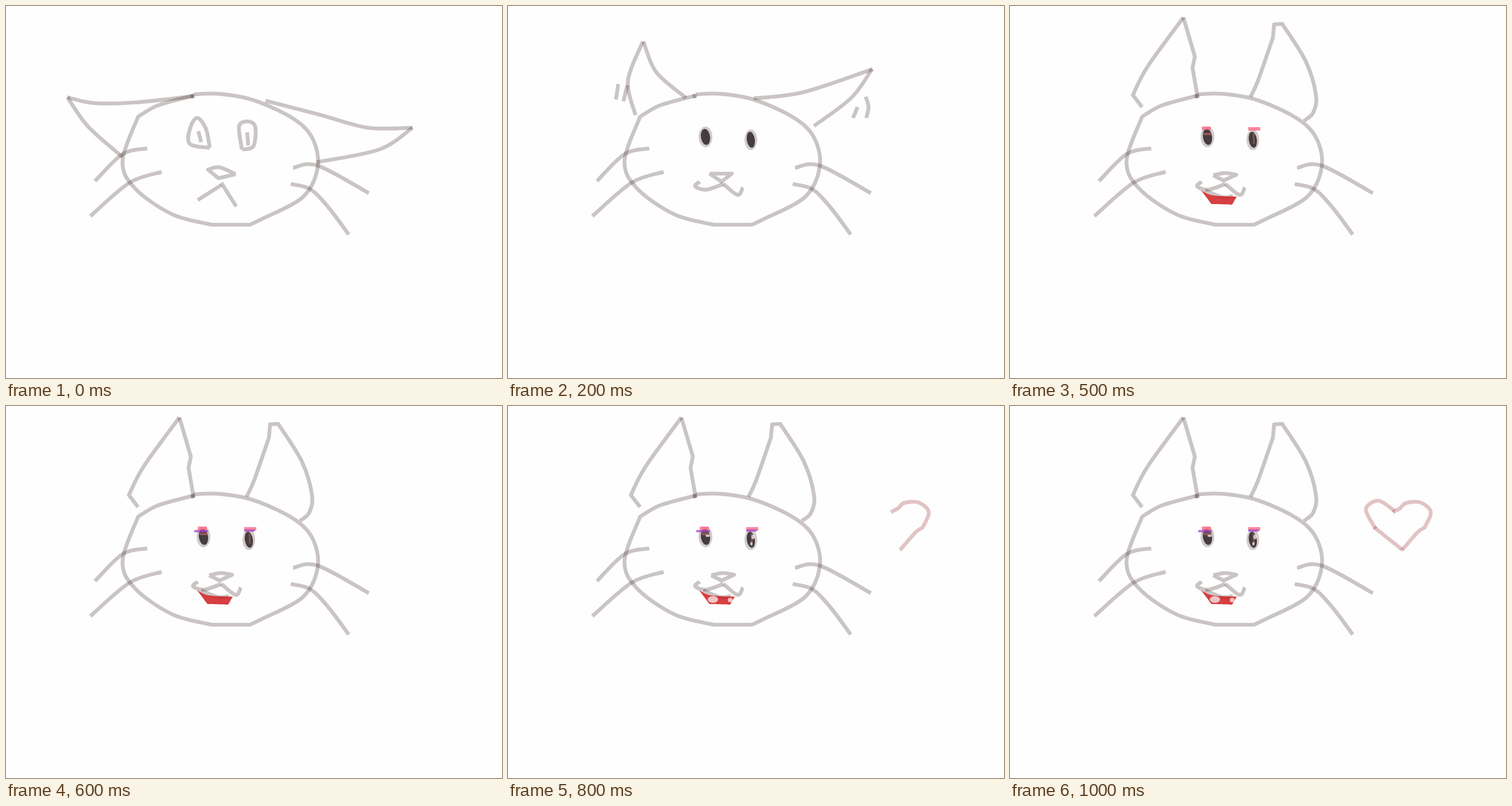
An HTML page with a canvas for the animation above (1.1 s loop, 864 by 648 pixels).

```html
<!DOCTYPE html>
<html lang="en">
<head>
<meta charset="utf-8">
<title>Cat sketch</title>
<style>
  html, body { margin: 0; width: 100%; height: 100%; overflow: hidden; background: #fdfefd; }
  canvas { display: block; filter: blur(.7px); }
</style>
</head>
<body>
<canvas id="stage" width="864" height="648"></canvas>
<script>
const STEP = 100, STEPS = 11;
const ctx = document.getElementById('stage').getContext('2d');
const INK = 'rgba(55,25,30,.25)', ROSE = 'rgba(150,30,40,.26)';
const parts = [];
let from, to;

// Everything added after show(a, b) is visible from step a up to, not including, step b.
function show(a, b = STEPS) { from = a; to = b; }

// Smooth curve through the points; "|" after a point makes it a corner.
function curve(text) {
  const path = new Path2D();
  let last = null;
  for (const span of text.split('|')) {
    const p = span.split(',').map(pair => pair.trim().split(' ').map(Number));
    if (last) p.unshift(last); else path.moveTo(...p[0]);
    for (let i = 0; i + 1 < p.length; i++) {
      const a = p[i - 1] || p[i], b = p[i], c = p[i + 1], d = p[i + 2] || c;
      path.bezierCurveTo(b[0] + (c[0] - a[0]) / 6, b[1] + (c[1] - a[1]) / 6,
        c[0] - (d[0] - b[0]) / 6, c[1] - (d[1] - b[1]) / 6, ...c);
    }
    last = p.at(-1);
  }
  return path;
}

function ink(text, color = INK, width = 6.6) {
  parts.push({ from, to, color, width, path: curve(text) });
}

function blob(color, x, y, rx, ry, tilt = 0) {
  const path = new Path2D();
  path.ellipse(x, y, rx, ry, tilt, 0, 2 * Math.PI);
  parts.push({ from, to, color, path });
}

function head() {
  show(0);
  ink('327 154, 370 153, 428 163, 497 194, 533 229, 543 280, 517 333, 446 371 | 425 381 | 358 381 | 290 363, 225 318, 203 270, 230 193 | 265 173, 327 156');
  blob(INK, 325, 157, 4, 4);
}

function whiskers() {
  show(0);
  ink('246 248, 203 258, 155 305');
  ink('271 289, 215 308, 147 366');
  ink('500 282, 543 278, 632 326');
  ink('496 310, 530 319, 561 350, 597 398');
}

function sadFace() {
  show(0, 1);
  ink('107 159, 152 169, 225 168, 327 157');
  ink('107 159, 143 210, 203 263');
  ink('452 165, 545 189, 630 212, 708 212');
  ink('708 212, 650 250, 541 272');
  ink('355 247 | 320 240, 321 212, 333 195, 348 213, 355 247');
  ink('335 218, 340 237');
  ink('411 250, 406 210, 420 201, 434 210, 431 244, 411 250');
  ink('420 220, 422 243');
  ink('400 293 | 372 281, 352 285 | 370 300 | 400 293');
  ink('334 338, 375 312');
  ink('375 308, 401 349');
}

function earsRising() {
  show(1, 2);
  ink('155 107, 195 136, 268 166, 292 165');
  ink('155 107, 168 165, 206 233');
  ink('133 192, 139 164, 155 151');
  ink('159 193, 161 166');
  ink('447 163, 505 171, 692 176');
  ink('692 174, 606 232, 540 248');
  ink('647 225, 652 211');
  ink('657 224, 672 203');
  blob('rgba(40,20,25,.6)', 338, 229, 5, 10, -.35);
  blob('rgba(40,20,25,.6)', 420, 234, 6, 11, -.1);
  ink('351 300 | 388 299 | 368 311 | 351 300');
  ink('333 328, 376 313');
  ink('375 313, 388 326, 405 333');
}

function earsHigher() {
  show(2, 3);
  ink('236 62, 258 115, 310 160');
  ink('235 62, 209 130, 222 190');
  ink('188 163, 192 136');
  ink('201 166, 208 138');
  ink('428 161, 515 150, 635 110');
  ink('634 110, 598 160, 533 209');
  ink('601 195, 609 176');
  ink('623 158, 628 176, 624 195');
  ink('351 292 | 390 292 | 372 306 | 351 292');
}

function earsUp() {
  show(3);
  ink('302 20, 322 88 | 318 108 | 327 160');
  ink('302 20 | 240 105, 214 155 | 230 176');
  ink('419 158, 432 130, 458 55 | 460 32 | 474 31 | 515 96, 533 155, 528 186, 512 200');
  ink('354 295, 374 291, 394 294 | 372 304 | 354 295');
  ink('340 321, 370 333, 388 331');
}

function smile() {
  show(2);
  ink('334 306, 326 314, 345 320, 375 310');
  ink('375 310, 400 329, 409 316');
}

// Both eyes share one shape rule: pale halo, dark core.
function eyes() {
  show(2);
  for (const [x, y, r] of [[344, 228, 8], [423, 233, 7]]) {
    blob('rgba(55,25,30,.22)', x, y, r + 4, 18);
    blob('rgba(22,12,14,.75)', x, y, r, 14, -.15);
  }
  show(3);
  ink('337 223, 350 223', 'rgba(225,120,120,.5)', 4);
  ink('424 222, 425 240', 'rgba(225,120,120,.4)', 3);
}

function makeup() {
  show(4);
  parts.push({ from, to, color: 'rgba(208,30,34,.85)',
    path: curve('333 321 | 354 330, 395 332 | 387 346 | 351 345 | 333 321') });
  show(5);
  ink('334 213, 350 213', 'rgba(255,95,125,.75)', 6);
  ink('415 214, 436 214', 'rgba(255,95,125,.75)', 6);
  show(6);
  ink('328 218, 352 218', 'rgba(165,70,205,.75)', 4);
  ink('415 217, 433 217', 'rgba(165,70,205,.75)', 4);
}

function highlights() {
  const shine = 'rgba(250,240,240,.75)';
  show(7);
  blob(shine, 348, 226, 4, 2);
  blob(shine, 427, 228, 3, 4);
  blob(shine, 424, 240, 2, 3);
  blob(shine, 357, 337, 9, 6);
  blob(shine, 387, 338, 4, 4);
}

function heart() {
  show(8);
  ink('667 185, 680 178 | 690 169, 715 168, 733 185, 722 212 | 710 220, 683 251', ROSE);
  show(9);
  ink('670 183, 642 165, 620 180, 637 214', ROSE);
  show(10);
  ink('634 211, 684 251', ROSE);
}

[head, whiskers, sadFace, earsRising, earsHigher, earsUp, smile, eyes, makeup, highlights, heart]
  .forEach(build => build());
ctx.lineJoin = 'round';

function draw(time) {
  const step = Math.floor(time / STEP) % STEPS;
  ctx.clearRect(0, 0, 864, 648);
  for (const { from, to, color, width, path } of parts) {
    if (step < from || step >= to) continue;
    ctx.fillStyle = ctx.strokeStyle = color;
    ctx.lineWidth = width || 1;
    if (width) ctx.stroke(path); else ctx.fill(path);
  }
}

let start;
function tick(now) {
  start ??= now;
  draw(now - start);
  requestAnimationFrame(tick);
}
draw(0);
requestAnimationFrame(tick);
</script>
</body>
</html>
```
